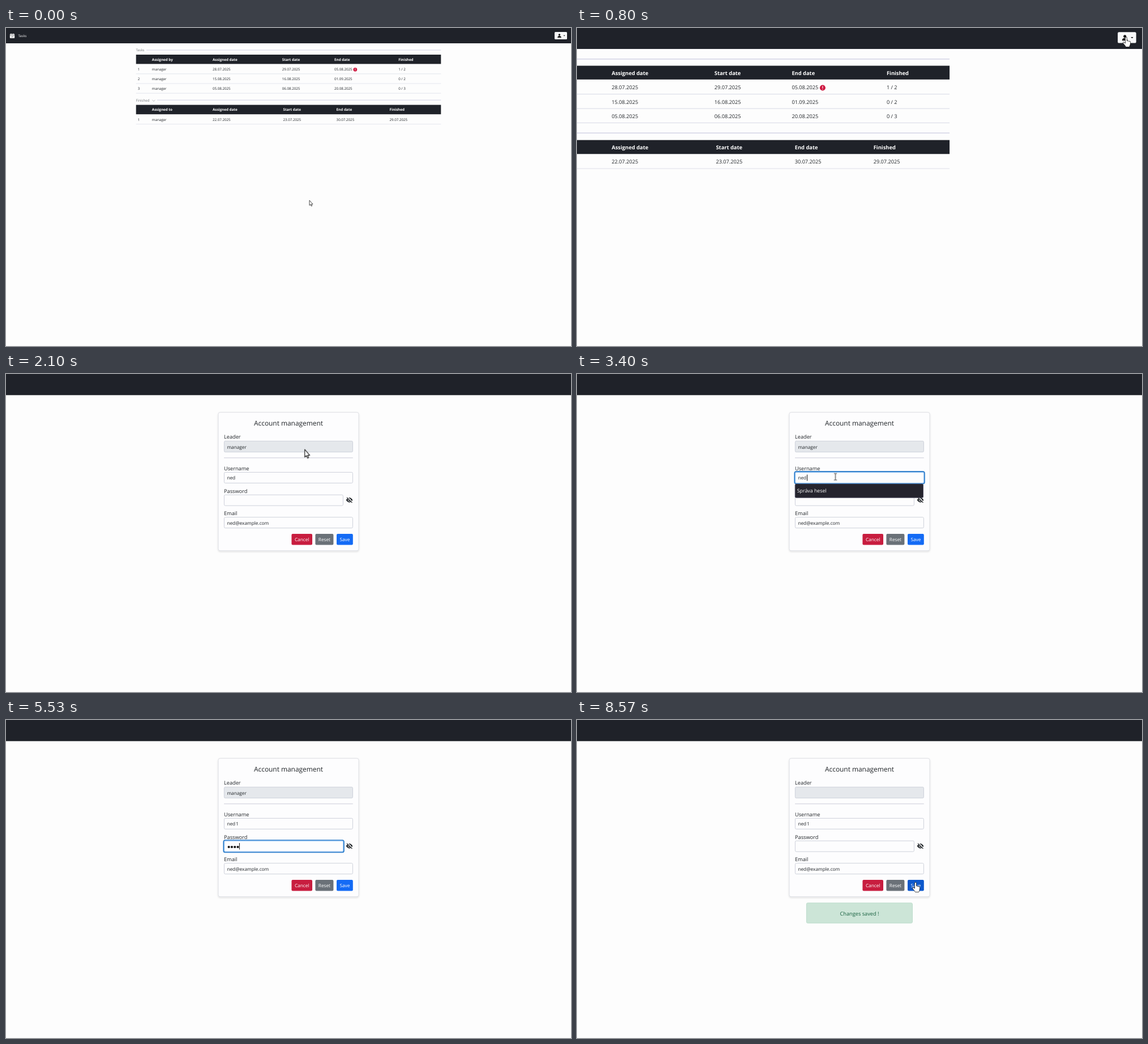
These frames come from a looping animation (998x561 px, 8.6 s). An HTML page:

```html
<!DOCTYPE html>
<html lang="en">
<head>
<meta charset="utf-8">
<title>Account management</title>
<style>
  html, body { margin: 0; width: 100%; height: 100%; overflow: hidden; background: #fdfdfd; }
  svg { display: block; width: 998px; height: 561px; font-family: "Open Sans", "Noto Sans", sans-serif; }
  text { fill: #212529; text-rendering: geometricPrecision; white-space: pre; }
  .bar { fill: #1f2229; }
  .page text { font-size: 6.2px; }
  .page .head { font-size: 6.3px; font-weight: 700; fill: #fff; }
  .page .legend { fill: #73777c; }
  .page .brand { font-size: 6px; fill: #f4f4f4; }
  .rule { stroke: #d3d3e6; stroke-width: 1; }
  .line { stroke: #dee0ea; stroke-width: .8; }
  .label { font-size: 9.2px; }
  .value { font-size: 8.27px; }
  .field { fill: #fdfdfe; stroke: #cdd1da; stroke-width: 1; }
  .off { fill: #e5e8ec; }
  .btn text, .pop text { fill: #fff; }
  .ring { fill: none; stroke: #1f74c6; stroke-width: 1.7; }
  .glow { fill: none; stroke: #9cc8f5; stroke-width: 1.2; }
  .caret { stroke: #111; stroke-width: 1; }
  .ptr { fill: #fff; stroke: #1b1b1b; stroke-width: .8; stroke-linejoin: round; }

  .step { animation: 8.6s step-end infinite; }
  .move { animation: 8.6s ease-in-out infinite; }

  @keyframes tasks { 0% { opacity: 1 } 12.79% { opacity: 0 } }
  @keyframes zoom {
    0%, .3% { transform: none }
    3.1%, 100% { transform: translate(-479px, -3px) scale(1.48) }
  }
  @keyframes account { 0% { opacity: 0 } 12.79% { opacity: 1 } }
  @keyframes pan {
    0%, 14.88% { transform: translate(-239px, 0) }
    18.02%, 100% { transform: none }
  }

  /* pointers */
  @keyframes startOn { 0% { opacity: 1 } 2.2% { opacity: 0 } }
  @keyframes startGo {
    0%, .3% { transform: translate(536px, 304px) }
    2.2%, 100% { transform: translate(760px, 140px) }
  }
  @keyframes menuOn { 0% { opacity: 0 } 5.2% { opacity: 1 } 12.79% { opacity: 0 } }
  @keyframes menuGo {
    0%, 5.2% { transform: translate(905px, 70px) scale(.676) }
    9%, 100% { transform: translate(979px, 13px) scale(.676) }
  }
  @keyframes enterOn { 0% { opacity: 0 } 20.35% { opacity: 1 } 28.49% { opacity: 0 } }
  @keyframes enterGo {
    0%, 20.35% { transform: translate(600px, 90px) scale(1.48) }
    28.49%, 100% { transform: translate(456px, 176px) scale(1.48) }
  }
  @keyframes beamOn {
    0% { opacity: 0 } 28.49% { opacity: 1 } 42.44% { opacity: 0 }
    45.35% { opacity: 1 } 52.33% { opacity: 0 }
  }
  @keyframes beamGo {
    0%, 45.35% { transform: translate(456.5px, 181.3px) }
    49.5%, 100% { transform: translate(468px, 222px) }
  }
  @keyframes leaveOn { 0% { opacity: 0 } 76.4% { opacity: 1 } 83.14% { opacity: 0 } }
  @keyframes leaveGo {
    0%, 76.4% { transform: translate(500px, 236px) scale(1.48) }
    83.14%, 100% { transform: translate(597px, 286px) scale(1.48) }
  }
  @keyframes handOn { 0% { opacity: 0 } 83.14% { opacity: 1 } }

  /* form */
  @keyframes userFocus { 0% { opacity: 0 } 31.98% { opacity: 1 } 50% { opacity: 0 } }
  @keyframes userCaret { 0% { transform: none } 42.44% { transform: translate(4.7px, 0) } }
  @keyframes popup { 0% { opacity: 0 } 33.72% { opacity: 1 } 42.44% { opacity: 0 } }
  @keyframes digit { 0% { opacity: 0 } 42.44% { opacity: 1 } }
  @keyframes passFocus { 0% { opacity: 0 } 50% { opacity: 1 } 74.2% { opacity: 0 } }
  @keyframes passCaret {
    0% { transform: translate(-21.2px, 0) } 52.9% { transform: translate(-15.9px, 0) }
    55.23% { transform: translate(-10.6px, 0) } 57.56% { transform: translate(-5.3px, 0) }
    60.47% { transform: none }
  }
  @keyframes dot1 { 0% { opacity: 0 } 52.9% { opacity: 1 } 90.7% { opacity: 0 } }
  @keyframes dot2 { 0% { opacity: 0 } 55.23% { opacity: 1 } 90.7% { opacity: 0 } }
  @keyframes dot3 { 0% { opacity: 0 } 57.56% { opacity: 1 } 90.7% { opacity: 0 } }
  @keyframes dot4 { 0% { opacity: 0 } 60.47% { opacity: 1 } 90.7% { opacity: 0 } }
  @keyframes hover { 0%, 84.1% { fill: #146bf5 } 85.8%, 100% { fill: #0d58cc } }
  @keyframes leader { 0% { opacity: 1 } 90.7% { opacity: 0 } }
  @keyframes saved { 0% { opacity: 0 } 90.7% { opacity: 1 } }
</style>
</head>
<body>
<svg viewBox="0 0 998 561">
  <defs>
    <path id="arrow" class="ptr" d="M0 0V9l2-1.7 1.4 3 1.3-.6-1.3-2.9H6z"/>
    <path id="hand" class="ptr" d="M-1.5 1.2a1.5 1.5 0 0 1 3 0v5l4.6 1q1.8.5 1.6 2.4l-.7 4q-.3 1.4-1.3 3.4h-6.2q-1-1.8-3-4l-1.8-2.6q-.4-1.6 1.2-1.8l2.6 1.9z"/>
    <g id="user">
      <rect x="969" y="7" width="22" height="13" rx="1.5" fill="#f8f9fa"/>
      <circle cx="977.5" cy="12" r="1.7" fill="#111"/>
      <path d="M974.2 17q0-2.9 3.3-2.9t3.3 2.9z" fill="#111"/>
      <path d="M984.6 12.8h3l-1.5 1.6z" fill="#111"/>
    </g>
    <filter id="shadow" x="-10%" y="-10%" width="120%" height="120%">
      <feDropShadow dx="0" dy="1.5" stdDeviation="1.6" flood-opacity=".13"/>
    </filter>
  </defs>
  <rect width="998" height="561" fill="#fdfdfd"/>

  <g class="step" style="animation-name:tasks">
    <g class="move page" style="animation-name:zoom">
      <rect class="bar" width="998" height="27"/>
      <path d="M6.8 12.4V11.5q0-.9.9-.9h.8V9.8h1v.8h3v-.8h1v.8h.8q.9 0 .9.9v.9z" fill="#f4f4f4"/>
      <path d="M6.8 13h8.4v4q0 1-1 1H7.8q-1 0-1-1z" fill="#f4f4f4"/>
      <path d="M9.5 15.2l1.1 1.1 2.1-2.1" fill="none" stroke="#1f2229" stroke-width=".7"/>
      <text class="brand" x="21.4" y="16.4">Tasks</text>
      <use href="#user"/>

      <text class="legend" x="229.4" y="41.4" style="font-size:6px">Tasks</text>
      <path class="rule" d="M248 39H768.3"/>
      <rect class="bar" x="229.7" y="47" width="538.6" height="16.4"/>
      <path class="line" d="M229.7 80.8H768.3M229.7 98H768.3M229.7 115.1H768.3"/>
      <g id="open"></g>
      <circle cx="616.8" cy="73.3" r="3.4" fill="#cf1a42"/>
      <path d="M616.8 71.3v2.3M616.8 74.5v.8" stroke="#fff" stroke-width=".8"/>

      <text class="legend" x="229.4" y="130">Finished</text>
      <path d="M258.4 127l2.5 2.3 2.5-2.3" fill="none" stroke="#9a9da2" stroke-width=".7"/>
      <path class="rule" d="M267 127.2H768.3"/>
      <rect class="bar" x="229.7" y="135.6" width="538.6" height="16.6"/>
      <path class="line" d="M229.7 169.6H768.3"/>
      <g id="done"></g>

      <g class="step" style="animation-name:startOn"><g class="move" style="animation-name:startGo"><use href="#arrow"/></g></g>
      <g class="step" style="animation-name:menuOn"><g class="move" style="animation-name:menuGo"><use href="#hand"/></g></g>
    </g>
  </g>

  <g class="step" style="animation-name:account">
    <rect class="bar" width="998" height="37.3"/>
    <g class="move" style="animation-name:pan">
      <use href="#user" transform="translate(-240 -3) scale(1.48)"/>
      <rect x="375" y="67.7" width="248" height="244" rx="3" fill="#fdfdfe" stroke="#dcdee3" filter="url(#shadow)"/>
      <text x="499" y="90.5" text-anchor="middle" font-size="11.9">Account management</text>

      <text class="label" x="385" y="114.4">Leader</text>
      <rect class="field off" x="385.4" y="118.3" width="227" height="19.4" rx="2"/>
      <text class="value step" x="390.4" y="131.6" style="animation-name:leader">manager</text>
      <path d="M385 147.9H612.8" stroke="#cbcdd8"/>

      <text class="label" x="385" y="169.9">Username</text>
      <rect class="field" x="385.4" y="173.4" width="227" height="19" rx="2"/>
      <text class="value" x="390.4" y="186">ned</text>
      <text class="value step" x="405.9" y="186" style="animation-name:digit">1</text>

      <text class="label" x="385" y="209.5">Password</text>
      <rect class="field" x="385.4" y="213.2" width="210" height="19" rx="2"/>
      <g fill="#151515">
        <circle class="step" style="animation-name:dot1" cx="393.6" cy="224" r="2.1"/>
        <circle class="step" style="animation-name:dot2" cx="398.9" cy="224" r="2.1"/>
        <circle class="step" style="animation-name:dot3" cx="404.2" cy="224" r="2.1"/>
        <circle class="step" style="animation-name:dot4" cx="409.5" cy="224" r="2.1"/>
      </g>
      <path d="M600.6 222.3q5.9-8.6 11.8 0q-5.9 8.6-11.8 0z" fill="#212529"/>
      <circle cx="606.5" cy="222.3" r="2.2" fill="none" stroke="#fdfdfe" stroke-width=".9"/>
      <path d="M602.6 217.2l9.2 9.2" stroke="#fdfdfe" stroke-width="2.2"/>
      <path d="M602 217.6l9.4 9.4" stroke="#212529" stroke-width="1.1"/>

      <text class="label" x="385" y="249.1">Email</text>
      <rect class="field" x="385.4" y="252.7" width="227" height="19" rx="2"/>
      <text class="value" x="390.4" y="265.5">ned@example.com</text>

      <g class="btn value" text-anchor="middle">
        <rect x="504.4" y="282" width="36.6" height="19.6" rx="2" fill="#c81d3f"/>
        <text x="522.7" y="295.2">Cancel</text>
        <rect x="546.4" y="282" width="32" height="19.6" rx="2" fill="#6a7178"/>
        <text x="562.4" y="295.2">Reset</text>
        <rect class="move" style="animation-name:hover" x="584" y="282" width="28.8" height="19.6" rx="2" fill="#146bf5"/>
        <text x="598.4" y="295.2">Save</text>
      </g>

      <g class="step" style="animation-name:userFocus">
        <rect class="ring" x="384.3" y="172.2" width="229.6" height="21.4" rx="3"/>
        <rect class="glow" x="385.6" y="173.5" width="227" height="18.8" rx="2"/>
        <path class="caret step" style="animation-name:userCaret" d="M406.6 177.5v11"/>
      </g>
      <g class="step pop" style="animation-name:popup">
        <rect x="385.2" y="194" width="226.4" height="24.2" rx="2" fill="#25242e" stroke="#45455a" stroke-width=".8"/>
        <text x="388.8" y="209.4" font-size="8.8">Správa hesel</text>
      </g>
      <g class="step" style="animation-name:passFocus">
        <rect class="ring" x="384.3" y="212" width="212.6" height="21.4" rx="3"/>
        <rect class="glow" x="385.6" y="213.3" width="210" height="18.8" rx="2"/>
        <path class="caret step" style="animation-name:passCaret" d="M412.4 217v11.5"/>
      </g>

      <g class="step" style="animation-name:saved">
        <rect x="405.4" y="322.8" width="187" height="35.4" rx="2" fill="#cce5d7" stroke="#bcdccb"/>
        <text class="label" x="499" y="345" text-anchor="middle" style="fill:#17603f">Changes saved !</text>
      </g>

      <g class="step" style="animation-name:enterOn"><g class="move" style="animation-name:enterGo"><use href="#arrow"/></g></g>
      <g class="step" style="animation-name:beamOn">
        <path class="move" style="animation-name:beamGo" d="M-2.5-5.8h2l.5.5.5-.5h2M0-5.3V5.3M-2.5 5.8h2l.5-.5.5.5h2" fill="none" stroke="#222"/>
      </g>
      <g class="step" style="animation-name:leaveOn"><g class="move" style="animation-name:leaveGo"><use href="#arrow"/></g></g>
      <g class="step" style="animation-name:handOn"><use href="#hand" x="598" y="286.6"/></g>
    </g>
  </g>
</svg>
<script>
  const row = (xs, y, cells, cls = "") => cells.split("|")
    .map((s, i) => `<text class="${cls}" x="${xs[i]}" y="${y}">${s}</text>`).join("");
  const fill = (id, ...rows) => { document.getElementById(id).innerHTML = rows.join(""); };

  const open = [232.8, 257.8, 365, 487.7, 580, 693.2];
  fill("open",
    row(open, 58.2, "|Assigned by|Assigned date|Start date|End date|Finished", "head"),
    row(open, 75.2, "1|manager|28.07.2025|29.07.2025|05.08.2025|1 / 2"),
    row(open, 92.3, "2|manager|15.08.2025|16.08.2025|01.09.2025|0 / 2"),
    row(open, 109.4, "3|manager|05.08.2025|06.08.2025|20.08.2025|0 / 3"));

  const done = [232.8, 257.8, 365, 489.5, 583.6, 677.5];
  fill("done",
    row(done, 146.3, "|Assigned to|Assigned date|Start date|End date|Finished", "head"),
    row(done, 163.7, "1|manager|22.07.2025|23.07.2025|30.07.2025|29.07.2025"));
</script>
</body>
</html>
```
